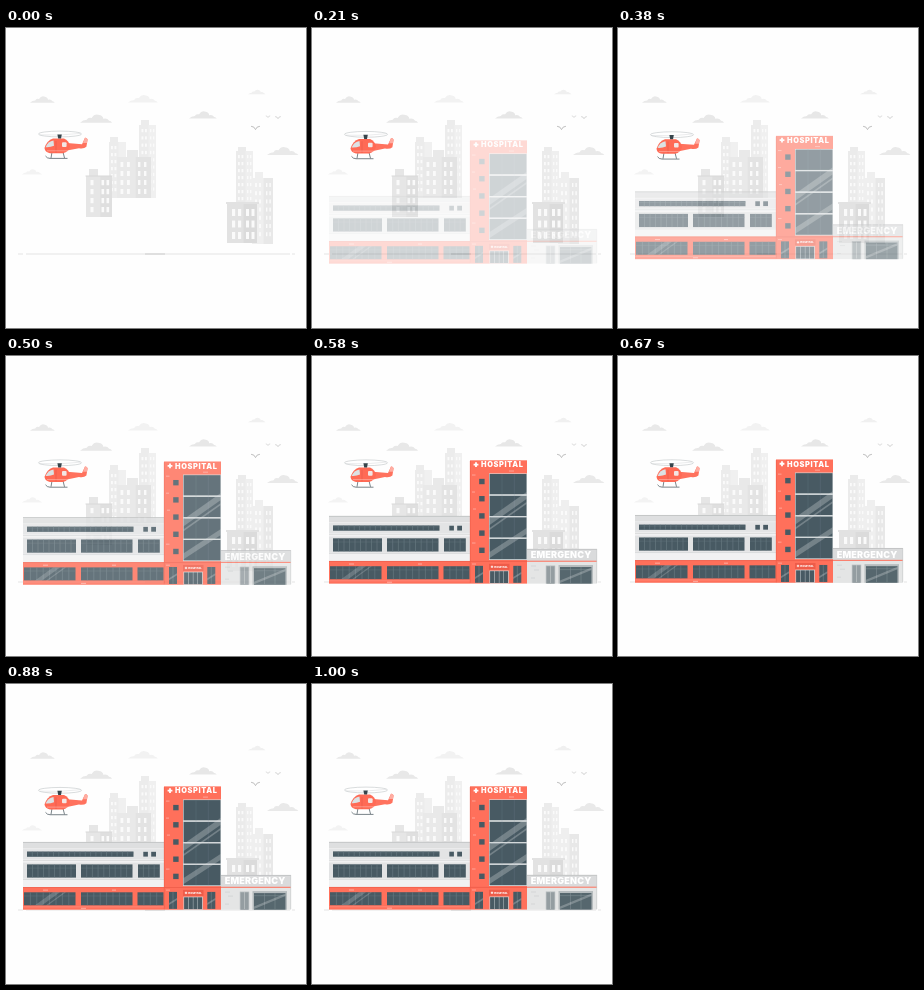
An HTML page for the animation above (1.04 s loop, 300 px wide and 300 px high).

```html
<!DOCTYPE html>
<html lang="en">
<head>
<meta charset="utf-8">
<title>Hospital</title>
<style>
  html, body { margin: 0; width: 100%; height: 100%; overflow: hidden; background: #fefefe; }
  svg { display: block; width: 100%; height: 100%; }
  text { font-family: Inter, "Open Sans", sans-serif; font-weight: 900; fill: #fff; }
</style>
</head>
<body>
<svg viewBox="0 0 300 300">
  <defs>
    <path id="cloud" d="M0 9Q3 6 7 6Q8 3 12 4Q15 -1 20 1Q24 2 24 5Q28 4 30 7Q32 7 33 9Z"/>
    <path id="bird" d="M-4 -2Q-1 -2 0 1Q1 -2 4 -2" fill="none" stroke="#b5b5b5" stroke-width=".8"/>
  </defs>
  <g id="sky"></g>
  <g id="city"></g>
  <path d="M12 226H17M20 226H284M286 226H289" stroke="#dcdcdc" stroke-width=".8"/>
  <path d="M139 226H159" stroke="#c8c8c8" stroke-width=".9"/>
  <g id="hospital"></g>
  <g id="helicopter">
    <ellipse cx="54" cy="106" rx="21.5" ry="2.9" fill="#fff" fill-opacity=".4" stroke="#c0c4c6" stroke-width=".6"/>
    <path d="M34 106.8L54 107L74 105.4" fill="none" stroke="#ccd0d1" stroke-width=".4"/>
    <path d="M46 124L45 130M57 124L58.5 130M39.5 128Q41 130.4 44 130.4H61.5" fill="none" stroke="#59656b" stroke-width=".8"/>
    <path d="M61 115L76 116.2L79 109.8Q81 109.6 81.6 111.5L80.4 118.8Q78 121 73 120.2L61 122.6Z" fill="#ff725e"/>
    <path d="M77 115L79 109.8Q81 109.6 81.6 111.5L81 115Z" fill="#ffada2"/>
    <path d="M38.5 120Q41 112.5 47 110.6H58Q63 113 64 118Q63 123.6 57 125.2H44Q39 124.5 38.5 120Z" fill="#ff6a55"/>
    <path d="M39.6 119.2Q42 113.2 47.5 112.6L48 117.8Q44 119.6 39.6 119.2Z" fill="#dce2e4"/>
    <rect x="56" y="114.3" width="4.6" height="4.6" rx="1" fill="#f3e6e4"/>
    <path d="M50 113V124.5" stroke="#dd5544" stroke-width=".5"/>
    <path d="M41 122.8H62" stroke="#ffc9c1" stroke-width=".5"/>
    <path d="M51.4 106.4H55.8L55 110.6H52.2Z" fill="#36444b"/>
  </g>
</svg>
<script>
const FPS = 24, LOOP = 1040;
const CORAL = '#ff705b', GLASS = '#485a63', BASE = 225.6;
const find = id => document.getElementById(id);
const rect = (x, y, w, h, fill, extra = '') =>
  `<rect x="${x}" y="${y}" width="${w}" height="${h}" fill="${fill}" ${extra}/>`;
const line = (d, color, width = .6, opacity = 1) =>
  `<path d="${d}" fill="none" stroke="${color}" stroke-width="${width}" opacity="${opacity}"/>`;
const label = (x, y, size, spacing, words) =>
  `<text x="${x}" y="${y}" font-size="${size}" letter-spacing="${spacing}">${words}</text>`;
const plus = (x, y, r) => line(`M${x - r} ${y}H${x + r}M${x} ${y - r}V${y + r}`, '#fff', r * .75);

function grid(x, y, cols, rows, dx, dy, w, h) {
  let out = '';
  for (let r = 0; r < rows; r++)
    for (let c = 0; c < cols; c++) out += rect(x + c * dx, y + r * dy, w, h, '#fafafa');
  return out;
}

function block(x, y, w, h, front, side, capX, capW, capH) {
  return rect(capX, y - capH, capW, capH, front) + rect(x, y, w, h, front) +
    rect(x + w * .55, y, w * .45, h, side);
}

// Glass band divided by thin mullions.
function glazing(x, y, w, h, pane) {
  let out = rect(x, y, w, h, GLASS);
  for (let p = x + pane; p < x + w - 1; p += pane) out += line(`M${p} ${y}V${y + h}`, '#70828a', .5);
  return out + line(`M${x} ${y + h * .28}H${x + w}`, '#65777f', .4);
}

const glint = (x, y, w, rise, thick) =>
  `<path d="M${x} ${y}L${x + w} ${y - rise}v${thick}L${x} ${y + thick}Z" fill="#fff" opacity=".24"/>`;

function drawSky() {
  const clouds = [
    [24, 68, .75, '#e9e9e9'], [74, 86, .97, '#e8e8e8'], [122, 66.5, .9, '#f2f2f2'],
    [183, 83, .84, '#e7e7e7'], [242, 61.5, .53, '#f0f0f0'], [261, 118.5, .95, '#e9e9e9'],
    [16, 141, .6, '#f3f3f3']
  ];
  const birds = [[262, 89, .55], [272, 90, .7], [249.5, 100.5, 1.1]];
  find('sky').innerHTML =
    clouds.map(([x, y, s, c]) => `<use href="#cloud" transform="translate(${x} ${y}) scale(${s})" fill="${c}"/>`).join('') +
    birds.map(([x, y, s]) => `<use href="#bird" transform="translate(${x} ${y}) scale(${s})"/>`).join('');
}

function drawCity() {
  find('city').innerHTML =
    block(133, 97, 17, 73, '#ececec', '#f0f0f0', 135, 8, 5) +
    grid(135.5, 101, 2, 9, 3.5, 7.3, 1.8, 3.2) + grid(144, 101, 2, 9, 3, 7.3, 1.3, 3.2) +
    block(103, 114, 17, 56, '#ececec', '#f0f0f0', 104, 8, 5) +
    grid(105, 118, 2, 7, 3.5, 7, 1.8, 3.2) +
    block(111, 129, 34, 41, '#e9e9e9', '#e3e3e3', 121, 11, 7) +
    grid(114.5, 134, 2, 4, 6.5, 9, 2.8, 5) + grid(132, 134, 2, 4, 6, 9, 2.4, 5) +
    block(80, 148, 26, 41, '#e6e6e6', '#dfdfdf', 83, 9, 7) +
    grid(84.5, 152, 1, 4, 5, 9, 3, 5.2) + grid(95.5, 152, 2, 4, 5, 9, 2.6, 5.2) +
    rect(79.5, 147.5, 27, 1, '#dadada') +
    block(230, 123, 17, 67, '#ebebeb', '#efefef', 232, 8, 4) +
    grid(232, 127, 2, 7, 3.5, 7, 1.8, 3.2) + grid(241, 127, 2, 7, 3, 7, 1.3, 3.2) +
    block(246, 150, 21, 66, '#efefef', '#e8e8e8', 249, 8, 6) +
    grid(249, 155, 2, 7, 4, 8.2, 2, 4) + grid(260, 155, 2, 7, 3.4, 8.2, 1.4, 4) +
    block(221, 176, 30, 39, '#e2e2e2', '#dbdbdb', 220, 33, 2) +
    grid(226, 181, 2, 3, 6, 11.5, 3.2, 7) + grid(240, 181, 2, 3, 5.5, 11.5, 3, 7);
}

function wing() {
  return rect(17, 158, 141, BASE - 158, '#f1f1f2') +
    rect(17, 158, 141, 5.5, '#dedfe0') + line('M17 158.3H158', '#b8babb', .7) +
    line('M17 163.8H158', '#cccecf', .5) +
    rect(17, 165, 141, 10, '#e3e4e5') + glazing(21, 167.4, 106.5, 5.3, 5.3) +
    rect(137.3, 167.7, 4.6, 4.8, GLASS) + rect(145.2, 167.7, 4.8, 4.8, GLASS) +
    line('M17 176.2H158', '#cfd1d2', .7) +
    rect(17, 178.5, 141, 16, '#e2e3e4') +
    glazing(21, 180.3, 49, 13.2, 5.5) + glazing(75, 180.3, 51.5, 13.2, 5.7) + glazing(132, 180.3, 21.8, 13.2, 5.4) +
    line('M17 195.4H158', '#cccecf', .6) +
    rect(17, 203, 141, BASE - 203, CORAL) + line('M17 203.4H158', '#ee5c49', .7) +
    glazing(18, 208.2, 51.5, 13, 6.4) + glazing(75, 208.2, 51.5, 13, 6.4) + glazing(131.5, 208.2, 26, 13, 6.4) +
    `<path d="M29 221.2L47 208.2H54L36 221.2ZM40 221.2L58 208.2H60L42 221.2Z" fill="#fff" opacity=".18"/>` +
    line('M17 222.8H158', '#ff9f92', .5) + line('M37 206h5M106 206h4M75 224.2h5', '#ffb5ab', .9);
}

function tower() {
  let out = rect(158, 102.3, 57, BASE - 102.3, CORAL) + line('M158.3 103V225', '#ee5c49', .6) +
    plus(164, 106.6, 2.4) + label(169, 109.4, 7.4, .6, 'HOSPITAL');
  for (let i = 0; i < 5; i++) out += rect(167.2, 120.8 + i * 17.2, 5.4, 5.4, GLASS);
  out += rect(177, 115.4, 38, 86.6, '#d9dddf');
  for (let i = 0; i < 4; i++) out += rect(177.6, 116 + i * 21.6, 36.9, 20.4, GLASS);
  out += line('M190 116V201M202.3 116V201', '#63757e', .4) +
    glint(177.6, 160, 36.9, 26, 7) + glint(177.6, 170, 36.9, 26, 2) + glint(177.6, 194, 36.9, 24, 6);
  for (let i = 0; i < 3; i++) out += rect(177, 136.4 + i * 21.6, 38, 1.2, '#d3d8da');
  out += line('M158 203.4H215', '#ee5c49', .8);
  for (const x of [163, 201.3])
    out += rect(x, 207.8, 8, BASE - 208.6, GLASS) + line(`M${x + 4} 207.8V225`, '#78898f', .5) + glint(x, 219, 8, 5, 2);
  out += rect(177, 205.8, 20.5, 6, '#ee5c49') + plus(180, 208.8, 1.2) +
    label(182.3, 209.8, 2.5, .1, 'HOSPITAL') + rect(177.5, 212.6, 19.3, BASE - 212.6, '#d3d8da');
  for (let i = 0; i < 4; i++) out += rect(178.1 + i * 4.6, 213.2, 4.2, BASE - 213.8, GLASS);
  return out + line('M160 117h3.5M160 134h3M161 151h3M160 185h3.5M197 113h5M160 206h4', '#ffb0a6', .8);
}

function annex() {
  return rect(215, 191, 70, BASE - 191, '#e4e5e5') + rect(215, 191, 70, 12, '#dadbdc') +
    line('M215 191.3H285', '#b9bbbc', .7) + line('M215 203.2H285', CORAL, 1) +
    label(218.8, 200.4, 9.1, .15, 'EMERGENCY') +
    rect(233.8, 207.5, 9.4, BASE - 207.5, '#b4babc') + rect(234.6, 208.3, 7.8, BASE - 208.3, '#949da1') +
    line('M238.5 208V225', '#d0d4d5', .5) +
    rect(246.5, 207, 34.5, BASE - 207, '#b6bcbe') + rect(248, 209, 31.5, BASE - 209, '#56676e') +
    line('M248 211.6H279.5M258.5 209V225M269 209V225', '#829097', .5) +
    glint(248, 222.5, 31.5, 13, 2.5) +
    line('M219 208h5M222 212h5M219 220h4', '#cccfd0', .7) + line('M284.7 191V225', '#c6c9ca', .6);
}

function render(ms) {
  const step = Math.floor((ms % LOOP + 5) * FPS / 1000);
  const elapsed = Math.max(0, step - 2);
  const fade = Math.min(1, elapsed / 12);
  const drop = Math.min(10.5, 14.5 * Math.pow(Math.max(0, 1 - elapsed / 22), 2.5));
  const bob = .8 * Math.sin(Math.PI * Math.min(1, elapsed / 22));
  const hospital = find('hospital');
  hospital.setAttribute('opacity', fade);
  hospital.setAttribute('transform', `translate(0 ${drop.toFixed(3)})`);
  find('helicopter').setAttribute('transform', `translate(0 ${bob.toFixed(3)})`);
}

drawSky();
drawCity();
find('hospital').innerHTML = wing() + annex() + tower();

const start = performance.now();
function tick() {
  render(performance.now() - start);
  requestAnimationFrame(tick);
}
render(0);
requestAnimationFrame(tick);
</script>
</body>
</html>
```
